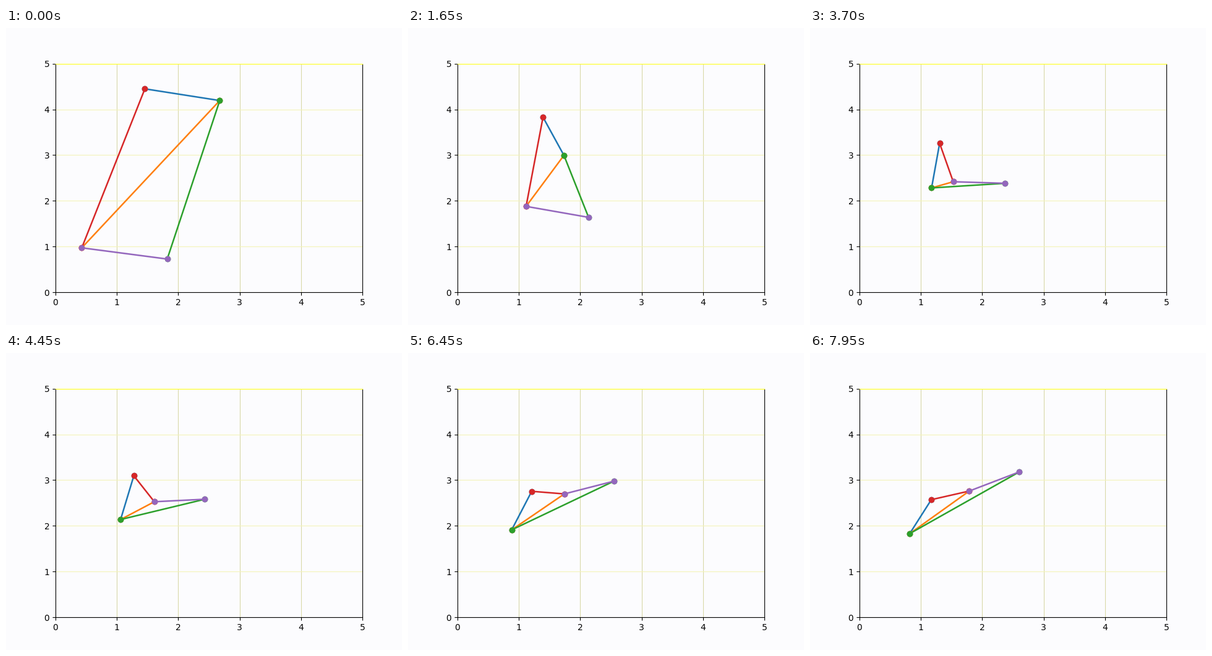
A matplotlib script for the animation above (8000 ms loop, 640x480 px).

```python
from itertools import combinations

import numpy as np
import matplotlib.pyplot as plt
from matplotlib.animation import FuncAnimation

FRAMES, INTERVAL = 160, 50
STEP = 0.005
PAPER = "#fcfcfe"

# Four agents steer towards fixed offsets from their neighbours.
# Every pair is linked except the first and the last.
start = np.array([(1.456, 4.449), (2.676, 4.193), (0.428, 0.973), (1.820, 0.728)])
offsets = np.array([-0.55, -0.855, 0.25, 1.155])
edges = [(i, j) for j, i in combinations(range(3, -1, -1), 2) if (i, j) != (0, 3)]
draw_order = sorted(edges, key=lambda e: (e != (0, 1), 2 not in e and e != (1, 3), e))

laplacian = np.zeros((4, 4))
for i, j in edges:
    laplacian[[i, j], [i, j]] += 1
    laplacian[[i, j], [j, i]] -= 1

goal = start.mean(axis=0) + offsets[:, None]
advance = np.eye(4) - STEP * laplacian

# Colour follows the link: cycle colours C0 to C4.
colors = {(0, 1): "C0", (1, 2): "C1", (1, 3): "C2", (0, 2): "C3", (2, 3): "C4"}


def positions(n):
    return goal + np.linalg.matrix_power(advance, n) @ (start - goal)


fig, ax = plt.subplots(figsize=(6.4, 4.8), dpi=100, facecolor=PAPER)
ax.set(xlim=(0, 5), ylim=(0, 5), xticks=range(6), yticks=range(6), facecolor=PAPER)
ax.grid(axis="x", color="#d8d8a8")
ax.grid(axis="y", color="#f4f4b8")
ax.spines["top"].set_color("#ffff20")
links = {e: ax.plot([], [], "o-", color=c, linewidth=1.8)[0] for e, c in colors.items()}


def update(n):
    points = positions(n)
    for (i, j), link in links.items():
        link.set_data(points[[i, j], 0], points[[i, j], 1])
    return list(links.values())


anim = FuncAnimation(fig, update, frames=FRAMES, interval=INTERVAL,
                     repeat=True, repeat_delay=0)
plt.show()
```
